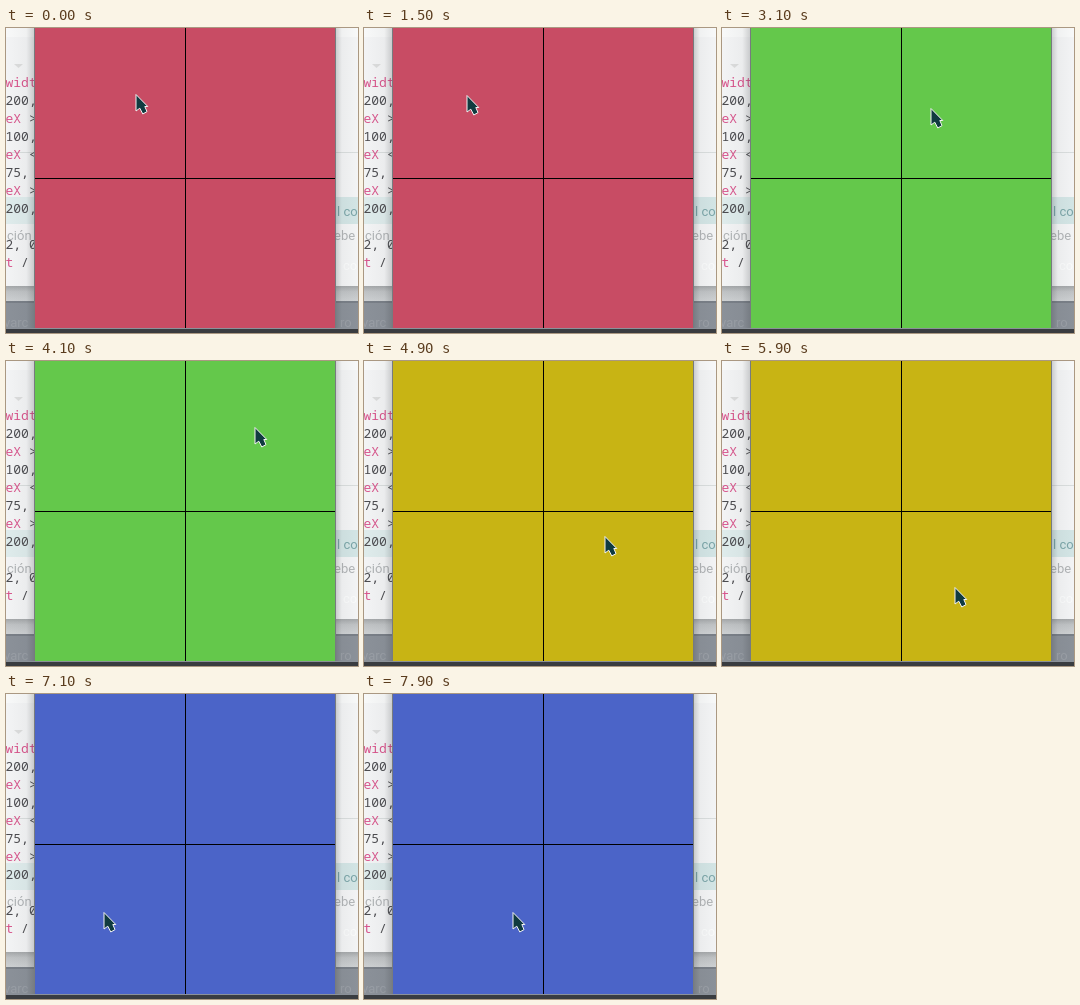
Recreate the animation shown at these times as an HTML page. Size 352 by 305 pixels, loop 8000 ms.

```html
<!DOCTYPE html>
<html lang="es">
<head>
<meta charset="utf-8">
<title>Cuadrantes</title>
<style>
  html, body { margin: 0; width: 100%; height: 100%; overflow: hidden; background: #f2f3f4; }
  svg { display: block; width: 100%; height: 100%; }
  text { white-space: pre; }
  #code { font: 300 13px "Noto Sans Mono", "DejaVu Sans Mono", monospace; fill: #4c4c50; }
  .key { fill: #d8558c; }
  .page { font: 13px Roboto, Inter, sans-serif; fill: #b0b3b5; }
</style>
</head>
<body>
<svg viewBox="0 0 352 305" preserveAspectRatio="none">
  <defs>
    <linearGradient id="drop" x2="0" y2="1">
      <stop stop-color="#a4a7a9"/><stop offset=".35" stop-color="#bfc2c4"/><stop offset="1" stop-color="#cfd2d4"/>
    </linearGradient>
    <linearGradient id="shade">
      <stop stop-color="#303438" stop-opacity="0"/>
      <stop offset=".7" stop-color="#303438" stop-opacity=".04"/>
      <stop offset="1" stop-color="#303438" stop-opacity=".24"/>
    </linearGradient>
  </defs>

  <rect width="352" height="305" fill="#f3f4f5"/>
  <rect width="352" height="9" fill="#f8f9f9"/>
  <path d="M8 36h9l-4.500 4z" fill="#dcdddd"/>
  <path d="M0 124.500H352" stroke="#d9dddd"/>
  <rect x="329" y="169" width="23" height="27" fill="#d3e5e5"/>
  <rect y="169" width="29" height="27" fill="#dfecec"/>
  <rect y="258" width="352" height="16" fill="url(#drop)"/>
  <rect y="273" width="352" height="2" fill="#797f87"/>
  <rect y="275" width="352" height="26" fill="#8b9199"/>

  <g class="page">
    <text x="1" y="212">ción</text>
    <text x="331" y="188" fill="#7ba5a8">l co</text>
    <text x="328" y="212">ebe c</text>
    <text x="337" y="242" fill="#fafbfb">co</text>
    <text x="-2" y="299" fill="#9a9fa6">varc</text>
    <text x="334" y="299" fill="#9a9fa6">ro</text>
  </g>
  <g id="code"></g>

  <rect width="29" height="300" fill="url(#shade)"/>
  <rect width="23" height="300" fill="url(#shade)" transform="matrix(-1 0 0 1 352 0)"/>
  <path d="M28.500 0V300M329.500 0V300" stroke="#777b7e"/>
  <rect y="301" width="352" height="4" fill="#393c40"/>

  <rect id="canvas" x="29" width="300" height="300"/>
  <path d="M179.500 0V300M29 150.500H329" stroke="#000" shape-rendering="crispEdges"/>
  <path id="cursor" d="M1 1.500V18L4.800 15.200L7.800 21L12 18.600L9.800 13.500H12.800Z"
        fill="#103b40" stroke="#f4f4f4" stroke-linejoin="round"/>
</svg>
<script>
const LOOP = 8000, STEP = 100;

// Each move: start and end time, then the points passed at equal intervals.
// The pointer rests between moves.
const home = [129, 65];
const moves = [
  [800, 1200, [106, 70]],
  [1400, 2400, [82, 48], [116, 79]],
  [2700, 3400, [200, 79], [240, 84]],
  [3500, 4400, [237, 76], [248, 65], [254, 92]],
  [4400, 4900, [240, 174]],
  [4900, 5100, [243, 203]],
  [5300, 6200, [236, 224], [225, 223]],
  [6200, 6900, [191, 228]],
  [6900, 7100, [97, 217]],
  [7100, 7400, [87, 209], [97, 207]],
  [7500, 7900, [160, 223], [148, 217]]
];

const code = ["*widt", "200,", "*eX >", "100,", "*eX <", "75,", "*eX >", "200,", "", "2, 0", "*t /"];
const codeGroup = document.getElementById("code");
const svgNode = (name, parent) =>
  parent.appendChild(document.createElementNS("http://www.w3.org/2000/svg", name));

code.forEach((line, i) => {
  const text = svgNode("text", codeGroup);
  text.setAttribute("x", -0.5);
  text.setAttribute("y", 59 + 18 * i);
  const [, star, word, rest] = line.match(/^(\*?)(\w*)(.*)$/);
  const key = svgNode("tspan", text);
  key.textContent = word;
  if (star) key.setAttribute("class", "key");
  text.append(rest);
});

// Catmull-Rom curve through the points, k from 0 to 1
function spline(points, k) {
  const last = points.length - 1;
  const i = Math.min(Math.floor(k * last), last - 1);
  const u = k * last - i;
  const at = n => points[Math.max(0, Math.min(last, n))];
  return [0, 1].map(axis => {
    const [a, b, c, d] = [-1, 0, 1, 2].map(n => at(i + n)[axis]);
    return b + u / 2 * (c - a + u * (2 * a - 5 * b + 4 * c - d + u * (3 * (b - c) + d - a)));
  });
}

function pointerAt(time) {
  let place = home;
  for (const [start, end, ...points] of moves) {
    if (time <= start) break;
    if (time < end) return spline([place, ...points], (time - start) / (end - start)).map(Math.round);
    place = points[points.length - 1];
  }
  return place;
}

function quadrantColor(x, y) {
  if (y < 150) return x < 179 ? "#c84c64" : "#64c84b";
  return x < 179 ? "#4b64c8" : "#c8b414";
}

const canvas = document.getElementById("canvas");
const cursor = document.getElementById("cursor");
const begin = performance.now();

function draw() {
  const time = (performance.now() - begin) % LOOP;
  const [x, y] = pointerAt(Math.floor(time / STEP) * STEP);
  cursor.setAttribute("transform", `translate(${x} ${y})`);
  canvas.setAttribute("fill", quadrantColor(x, y));
  requestAnimationFrame(draw);
}
draw();
</script>
</body>
</html>
```
